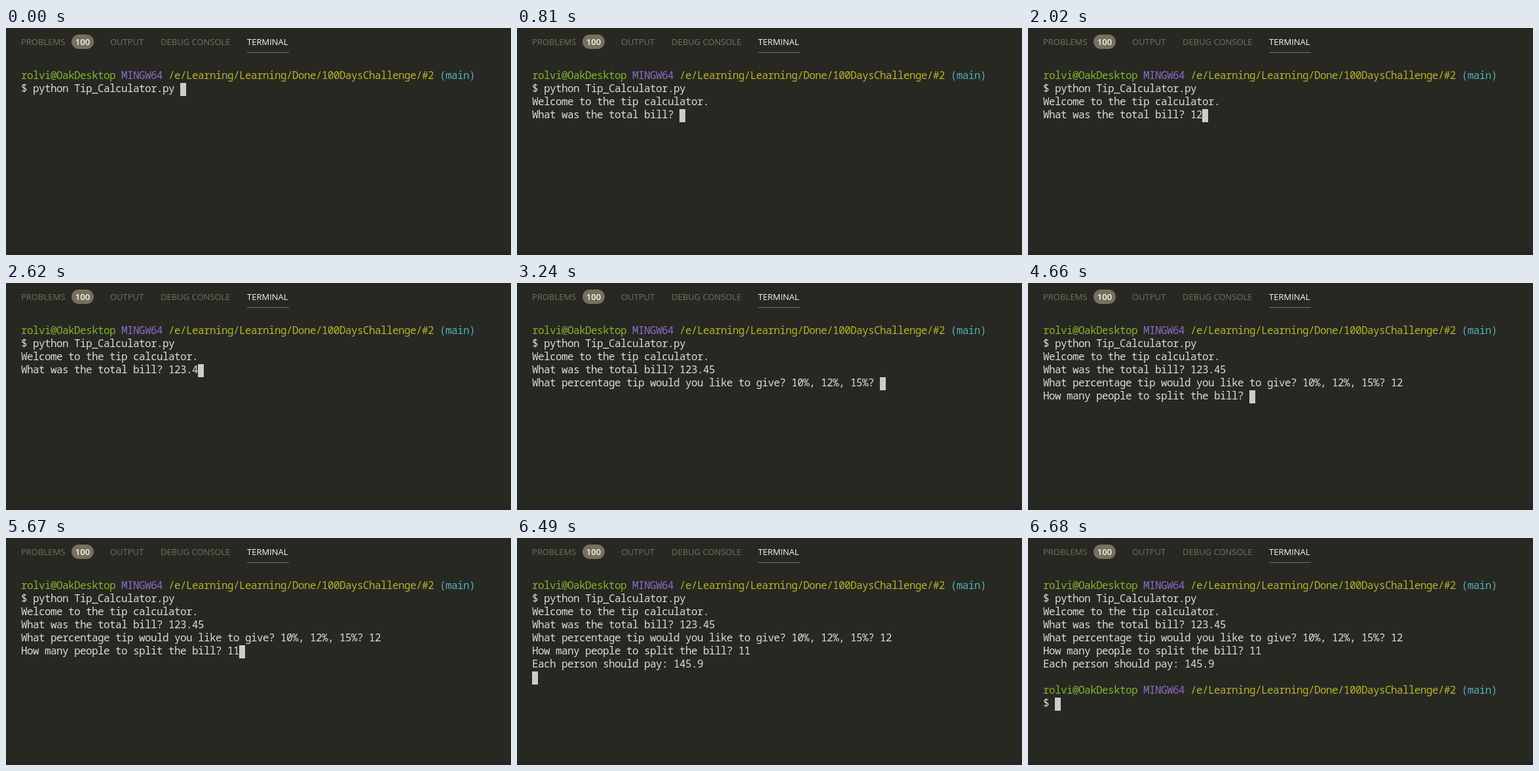
An HTML page that plays this animation: 771 by 347 pixels, repeating every 9320 ms.

```html
<!DOCTYPE html>
<html lang="en">
<head>
<meta charset="utf-8">
<title>Tip calculator in a terminal</title>
<style>
  html, body { margin: 0; width: 100%; height: 100%; overflow: hidden; background: #272822; }
  .stage { position: relative; width: 771px; height: 347px; overflow: hidden; }
  .stage > * { position: absolute; }
  .tab, .badge { font: 13px/20px "Open Sans", "Noto Sans", sans-serif; white-space: nowrap; }
  .tab { top: 11px; color: #75715e; }
  .active { color: #f8f8f2; font-weight: 500; }
  .badge {
    left: 100px; top: 10px; width: 34px; height: 22px; border-radius: 11px;
    background: #75715e; color: #f8f8f2; font-weight: 600; line-height: 22px; text-align: center;
  }
  .line { left: 368px; top: 37px; width: 64px; height: 1px; background: #75715e; }
  .edge { left: 0; top: 342px; width: 771px; height: 5px; background: #242520; }
  pre {
    left: 23px; top: 62px; margin: 0; color: #dcdcd8;
    font: 500 16px/20px "Noto Sans Mono", "DejaVu Sans Mono", monospace;
    letter-spacing: -0.6px;
    font-variant-ligatures: none;
  }
  .user { color: #86b42b; }
  .sys { color: #8c6bc8; }
  .path { color: #b3b42b; }
  .git { color: #56adbc; }
  #cursor { left: 23px; top: 64px; width: 9px; height: 20px; background: #cccccc; }
</style>
</head>
<body>
<div class="stage">
  <span class="tab" style="left:23px">PROBLEMS</span>
  <span class="badge">100</span>
  <span class="tab" style="left:159px">OUTPUT</span>
  <span class="tab" style="left:236px">DEBUG CONSOLE</span>
  <span class="tab active" style="left:368px">TERMINAL</span>
  <div class="line"></div>
  <div class="edge"></div>
  <div id="cursor"></div>
  <pre id="term"></pre>
</div>
<script>
  const LOOP = 9320, COL = 9, ROW = 20;
  const term = document.getElementById("term");
  const cursor = document.getElementById("cursor");

  const span = (name, text) => `<span class="${name}">${text}</span>`;
  const prompt = [
    span("user", "rolvi@OakDesktop"),
    span("sys", "MINGW64"),
    span("path", "/e/Learning/Learning/Done/100DaysChallenge/#2"),
    span("git", "(main)")
  ].join(" ") + "\n$ ";

  // Each entry appends its text at the given time in ms.
  const script = [
    [0, prompt + "python Tip_Calculator.py "],
    [810, "\nWelcome to the tip calculator.\nWhat was the total bill? "],
    [2020, "12"],
    [2220, "3"],
    [2420, "."],
    [2620, "4"],
    [2840, "5"],
    [3240, "\nWhat percentage tip would you like to give? 10%, 12%, 15%? "],
    [4050, "1"],
    [4240, "2"],
    [4660, "\nHow many people to split the bill? "],
    [5450, "1"],
    [5670, "1"],
    [6490, "\nEach person should pay: 145.9\n"],
    [6680, "\n" + prompt]
  ];

  let shown = -1;

  function draw(now) {
    const t = now % LOOP;
    const count = script.filter(([at]) => at <= t).length;
    if (count !== shown) {
      shown = count;
      term.innerHTML = script.slice(0, count).map(([, text]) => text).join("");
      const lines = term.textContent.split("\n");
      const row = lines.length - 1;
      cursor.style.transform = `translate(${lines[row].length * COL}px, ${row * ROW}px)`;
    }
  }

  const start = performance.now();
  function tick() {
    draw(performance.now() - start);
    requestAnimationFrame(tick);
  }
  tick();
</script>
</body>
</html>
```
